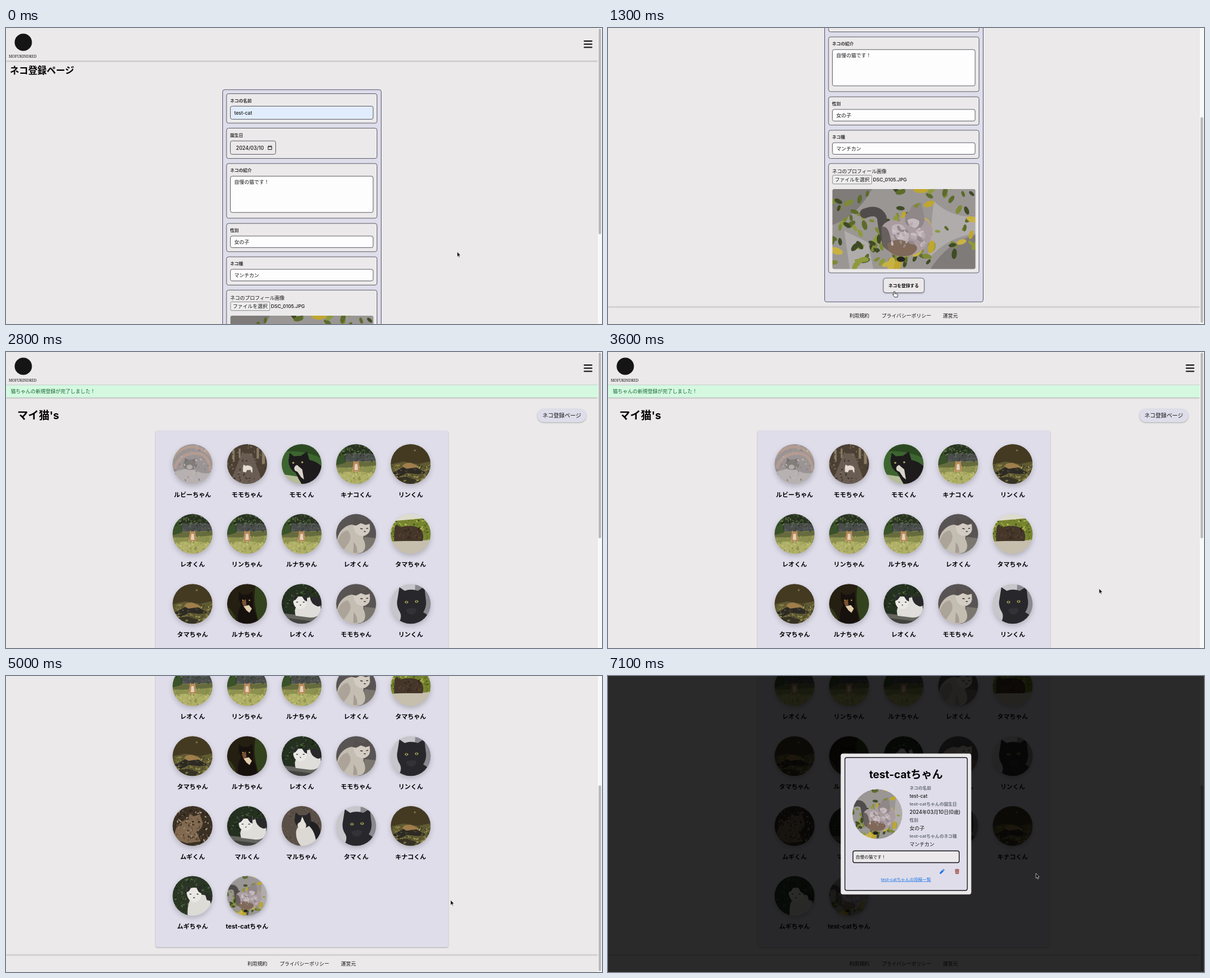
An HTML page that plays this animation: 1000 by 498 pixels, repeating every 7200 ms.

```html
<!DOCTYPE html>
<html lang="ja">
<head>
<meta charset="utf-8">
<title>ネコ登録ページ</title>
<style>
html, body { margin: 0; width: 100%; height: 100%; overflow: hidden; background: #ebe9ea; }
svg { display: block; }
#stage { width: 100vw; height: 100vh; }
text {
  font: 500 8.35px Inter, "Noto Sans CJK JP", "Noto Sans CJK", sans-serif;
  dominant-baseline: central; fill: #151515;
}
.h1 { font-size: 15.5px; font-weight: 700; fill: #000; }
.h2 { font-size: 18px; font-weight: 700; fill: #000; }
.label { font-size: 7.3px; font-weight: 700; fill: #333; }
.hint { font-size: 7.3px; font-weight: 700; fill: #6b7078; }
.name { font-size: 10.4px; font-weight: 700; text-anchor: middle; fill: #000; }
.latin { font-size: 8px; }
.mid { text-anchor: middle; }
.brand { font: 6.2px "Noto Serif", serif; }
.link { font-size: 7.2px; font-weight: 400; fill: #1f75e5; text-decoration: underline; dominant-baseline: auto; }
.card { fill: #ebe9ea; stroke: #4b4b55; stroke-width: .85; }
.field { fill: #fdfdfd; stroke: #4b4b55; stroke-width: .85; }
.raised { filter: drop-shadow(0 1px 1.2px rgba(0,0,0,.28)); }
.disc { filter: drop-shadow(0 4px 4px rgba(0,0,0,.2)); }
.photo { filter: blur(.7px); }

/* The picture holds for 100 ms at a time; the small lead keeps each step on its tick. */
.anim { animation: 7200ms step-end -4ms infinite; }
#form { animation-name: form; }
#list { animation-name: list; }
#formBody { animation-name: form-scroll; }
#formThumb { animation-name: form-thumb; }
#listBody { animation-name: list-scroll; }
#listThumb { animation-name: list-thumb; }
#modal { animation-name: modal; }
#cursor { animation-name: cursor; }
#arrow { animation-name: arrow; }
#hand { animation-name: hand; }
.hover { animation-name: hover; }

@keyframes form { 0% { opacity: 1 } 34.722%, 100% { opacity: 0 } }
@keyframes list { 0% { opacity: 0 } 34.722%, 100% { opacity: 1 } }
@keyframes form-scroll {
  0% { transform: translateY(0) }
  11.111% { transform: translateY(0); animation-timing-function: steps(4) }
  16.667%, 100% { transform: translateY(-213px) }
}
@keyframes form-thumb {
  0% { transform: translateY(0) }
  11.111% { transform: translateY(0); animation-timing-function: steps(4) }
  16.667%, 100% { transform: translateY(149px) }
}
@keyframes list-scroll {
  0% { transform: translateY(0) }
  66.667% { transform: translateY(0); animation-timing-function: steps(2) }
  69.444%, 100% { transform: translateY(-289px) }
}
@keyframes list-thumb {
  0% { transform: translateY(0) }
  66.667% { transform: translateY(0); animation-timing-function: steps(2) }
  69.444%, 100% { transform: translateY(183px) }
}
@keyframes hover {
  0% { transform: scale(1) }
  76.389% { transform: scale(1); animation-timing-function: steps(2) }
  79.167% { transform: scale(1.09) }
  84.722%, 100% { transform: scale(1) }
}
@keyframes modal {
  0% { opacity: 0 }
  83.333% { opacity: 0; animation-timing-function: steps(2) }
  86.111%, 100% { opacity: 1 }
}
@keyframes cursor {
  0% { transform: translate(757px, 376.5px); opacity: 1 }
  4.167% { transform: translate(757px, 376.5px); animation-timing-function: steps(5) }
  11.111% { transform: translate(480.5px, 443px) }
  34.722% { opacity: 0 }
  50% { transform: translate(824px, 398px); opacity: 1; animation-timing-function: steps(4) }
  55.556% { transform: translate(775px, 382.5px) }
  66.667% { transform: translate(775px, 382.5px); animation-timing-function: steps(2) }
  69.444% { transform: translate(746px, 377px) }
  72.222% { transform: translate(746px, 377px); animation-timing-function: steps(5) }
  79.167% { transform: translate(403px, 387px) }
  84.722% { transform: translate(403px, 387px); animation-timing-function: steps(3) }
  88.889%, 100% { transform: translate(718px, 332px); opacity: 1 }
}
@keyframes arrow { 0% { opacity: 1 } 16.667% { opacity: 0 } 34.722%, 100% { opacity: 1 } }
@keyframes hand { 0% { opacity: 0 } 16.667% { opacity: 1 } 34.722%, 100% { opacity: 0 } }
</style>
</head>
<body>
<svg id="stage" viewBox="0 0 1000 498" preserveAspectRatio="none">
<defs>
  <clipPath id="disc"><circle r="33.5"/></clipPath>
  <clipPath id="frame"><rect width="240" height="134.5" rx="3"/></clipPath>
  <rect id="fill" x="-40" y="-40" width="80" height="80"/>

  <g id="header">
    <rect class="raised" width="993" height="55" fill="#ebe9ea"/>
    <circle cx="29" cy="24" r="14.5" fill="#151515"/>
    <text class="brand mid" x="28" y="47">MOFUKINDRED</text>
    <path d="M970.3 22h12.6M970.3 27.2h12.6M970.3 32.4h12.6" stroke="#111" stroke-width="2" stroke-linecap="round"/>
  </g>
  <g id="footer">
    <rect y="1.3" width="993" height="28" fill="#ebe9ea" style="filter:drop-shadow(0 -1px 1px rgba(0,0,0,.25))"/>
    <text x="405" y="14.5">利用規約</text>
    <text x="459" y="14.5">プライバシーポリシー</text>
    <text x="562" y="14.5">運営元</text>
  </g>

  <g id="blanket" class="photo">
    <use href="#fill" fill="#9b9494"/>
    <path d="M-34-12Q-10-36 12-26T34-4M-30 8Q-24-16 2-18T30 12" fill="none" stroke="#b39c92" stroke-width="5"/>
    <path d="M-40 18Q-12 2 8 12T40 6V40H-40z" fill="#b7b2b1"/>
    <ellipse cx="-4" cy="1" rx="12" ry="9" fill="#827d7b"/>
    <path d="M-13-3l0-7 6 3zM4-4l2-6-7 3z" fill="#75706f"/>
    <ellipse cx="-5" cy="5" rx="5" ry="4" fill="#b3aca9"/>
    <g data-specks="#8b8585 #a99f9c #c2b7b2" data-area="-34 -34 68 68" data-count="50"/>
  </g>
  <g id="lane" class="photo">
    <use href="#fill" fill="#4b4033"/>
    <path d="M-9-18H8L30 40H-32z" fill="#695d53"/>
    <path d="M-25-24h4v20h-4zM-14-26h3v16h-3zM16-27h4v18h-4zM25-24h5v24h-5z" fill="#8b7c66"/>
    <g data-specks="#5a4c3d #3c3328 #7c6d5f" data-area="-34 -34 68 68" data-count="80"/>
    <path d="M-7 13V6l1-5 4 2 3-1 6 2 2 3v7H7L6 10H0l-2 4z" fill="#e6dcd4"/>
  </g>
  <g id="tuxedo" class="photo">
    <use href="#fill" fill="#3d6530"/>
    <path d="M-40-40H40V-6Q8-26-40-20z" fill="#2c4a22"/>
    <path d="M-40 16L0 22V40H-40z" fill="#b4bd98"/>
    <path d="M-22-6L-20-19-13-13-1-14 9-21 13-7Q30-4 40 12V40H4Q-4 28-10 15-22 8-22-6z" fill="#1d1b1c"/>
    <path d="M-12 5Q-8-1-5 4L1 9 4 26-1 22-7 13Q-14 11-12 5z" fill="#d9d4ca"/>
    <circle cx="-14" cy="-2" r="1.7" fill="#a3a45a"/><circle cx="1" cy="-3" r="1.7" fill="#a3a45a"/>
  </g>
  <g id="garden" class="photo">
    <use href="#fill" fill="#2a3423"/>
    <rect x="-18" y="-18" width="58" height="15" fill="#4a4e4b"/>
    <path d="M-40-4Q-8-3 40-6V40H-40z" fill="#8d9150"/>
    <path d="M-40 16Q0 8 40 18V40H-40z" fill="#b0b068"/>
    <path d="M-40-5Q0-1 40-6V1Q0 8-40 5z" fill="#666b3e"/>
    <path d="M-40-40H-15Q-21-16-18-2L-40 4z" fill="#3a5229"/>
    <g data-specks="#c3c27c #858b48 #a3a65a" data-area="-34 4 68 30" data-count="110"/>
    <g data-specks="#495f35 #202a1b #66784a" data-area="-34 -34 68 20" data-count="60"/>
    <g data-specks="#3d403d #5d625e" data-area="-18 -18 52 14" data-count="30"/>
    <path d="M-4-6l2 2h4l2-2 1 6 1 9-1 4H1l-1-2-1 2h-4l-1-4 1-9z" fill="#b98a5c"/>
    <path d="M-2 0h4l1 10h-6z" fill="#e3d3bb"/>
  </g>
  <g id="rocks" class="photo">
    <use href="#fill" fill="#443a22"/>
    <path d="M-40 2L-12-4 12 0 40-6V40H-40z" fill="#605a32"/>
    <g data-specks="#8f8948 #3d3a26 #a39f62" data-area="-34 0 68 34" data-count="110"/>
    <path d="M-30 15L-12 5 10 6 26 15 12 17-6 15-20 22z" fill="#2d2a24"/>
    <path d="M-40 26L-8 21 10 27 0 40H-40z" fill="#373324"/>
    <path d="M-14 4Q-12-3 0-2L10 2 14 5-7 8z" fill="#a07d4b"/>
    <g data-specks="#7d7745 #4b4630" data-area="-30 8 60 22" data-count="35"/>
    <circle cx="7" cy="-23" r="1.6" fill="#837546"/>
  </g>
  <g id="cream" class="photo">
    <use href="#fill" fill="#595454"/>
    <path d="M14 5L40 8V40H7z" fill="#7b776f"/>
    <path d="M-32 28Q-36-2-16-13-6-18 0-14 14-8 12 8 20 26 8 32-14 38-32 28z" fill="#c4bdb2"/>
    <path d="M-5-14L-2-26 5-22Q12-24 16-22L22-27 23-12Q25-2 15 3 3 5-2-4z" fill="#d3ccc3"/>
    <path d="M-6-15L-3-28 5-23 15-23 22-28 23-17 16-15 8-18 0-14z" fill="#55504e"/>
    <path d="M-31 12Q-26-4-14-6-6 4-12 14T-22 28z" fill="#aca499"/>
    <path d="M-4 14Q2 20 2 32H-5z" fill="#a59d93"/>
    <path d="M7-9l4 .6M17-9l3-.6M13-4h3" stroke="#3a3532" stroke-width="1.5"/>
  </g>
  <g id="ledge" class="photo">
    <use href="#fill" fill="#77852f"/>
    <g data-specks="#b6ba55 #5f7027 #39481c" data-area="-34 -32 68 44" data-count="130"/>
    <path d="M-40-40H40V-28L-25-22-40-24z" fill="#dedccd"/>
    <path d="M-40 13L40 10V40H-40z" fill="#c6bfae"/>
    <path d="M-28 12L-27-12-23-16-18-11-9-13Q10-16 18-6 23 2 20 12z" fill="#45362a"/>
    <g data-specks="#5b4733 #33271b" data-area="-22 -9 38 18" data-count="25"/>
  </g>
  <g id="shade" class="photo">
    <use href="#fill" fill="#251f12"/>
    <path d="M16-40H40V40H24Q6 0 16-40z" fill="#33431e"/>
    <path d="M-40 2Q-20 8-16 40H-40z" fill="#343a1b"/>
    <path d="M-15 40Q-18 12-10 2L-14-8-14-20-7-15 3-16 9-21 10-8Q10-1 10 6 18 18 16 40z" fill="#17110e"/>
    <path d="M-9-3L-2-8-1 2-6 4z" fill="#7b5133"/>
    <path d="M-6 4L3 2 8 8 4 15-1 11z" fill="#e3cfae"/>
    <circle cx="-7" cy="-6" r="1.3" fill="#b59a4d"/><circle cx="4" cy="-6" r="1.3" fill="#b59a4d"/>
  </g>
  <g id="stone" class="photo">
    <use href="#fill" fill="#243020"/>
    <g data-specks="#384b2d #17200f #49603b" data-area="-34 -34 68 46" data-count="90"/>
    <path d="M-40 15L40 24V40H-40z" fill="#64645f"/>
    <path d="M-40 22L40 32V40H-40z" fill="#42433f"/>
    <path d="M-10 20Q-13 10-9 5 4-13 21-11 33-6 32 10 30 24 14 23z" fill="#dfdeda"/>
    <path d="M-14-3L-12-16-6-12Q-2-13 2-12L9-17 9-2Q8 8-3 9-13 7-14-3z" fill="#eae8e5"/>
    <path d="M-14-5L-12-17-6-12-10-7zM1-12L9-18 9-4 5-6zM14-12Q28-16 33-4 34 6 26 4 15 0 14-12z" fill="#29282b"/>
    <path d="M-9-3h3M2-3h3M-3 2h2" stroke="#4b4b40" stroke-width="1.5"/>
  </g>
  <g id="black" class="photo">
    <use href="#fill" fill="#c6c6cb"/>
    <path d="M8-40H40V40H4z" fill="#89898f"/>
    <path d="M-28 40Q-12 26-18 14-25 4-22-9L-19-28-10-22Q0-26 12-22L23-29 25-10Q28 4 21 14 36 22 40 40z" fill="#28282c"/>
    <path d="M-8 10Q1 4 10 9 8 18 1 18-6 17-8 10z" fill="#333337"/>
    <ellipse cx="-7" cy="-3" rx="2.8" ry="2" fill="#a8a25e"/><ellipse cx="10" cy="-4" rx="2.8" ry="2" fill="#a8a25e"/>
    <circle cx="-7" cy="-3" r="1"/><circle cx="10" cy="-4" r="1"/>
  </g>
  <g id="tabby" class="photo">
    <use href="#fill" fill="#3b3024"/>
    <g data-specks="#b8a58c #5f4d38 #241c15" data-area="-34 -34 68 68" data-count="120"/>
    <path d="M-31 22Q-30-8-7-11L-5-21 2-16 12-20 17-6Q17 6 6 10L14 26-10 29z" fill="#80694f"/>
    <g data-specks="#403226 #a28c70 #5e4a37" data-area="-27 -12 40 36" data-count="60"/>
    <path d="M-1-7h3M9-7h3" stroke="#1f1813" stroke-width="2"/>
  </g>
  <g id="proud" class="photo">
    <use href="#fill" fill="#5b5047"/>
    <g data-specks="#6b6056 #4a4038" data-area="-34 -34 68 68" data-count="60"/>
    <path d="M11-8Q30-8 32 13L25 32 10 22z" fill="#201f21"/>
    <path d="M-9 8Q-6-4 10-2 24 8 25 34H-1Q-11 22-9 8z" fill="#dcd8d3"/>
    <path d="M-12-10L-10-23-4-18 7-18 14-23 16-8Q14 3 2 4-10 3-12-10z" fill="#262527"/>
    <path d="M1-16L5-7Q10-1 6 4-1 7-6 2-9-4-2-7z" fill="#e4dfd9"/>
  </g>
  <g id="hedge" class="photo">
    <use href="#fill" fill="#2a3724"/>
    <g data-specks="#405235 #1b2617 #566b47" data-area="-34 -34 68 68" data-count="110"/>
    <path d="M-8 36Q-10 14-3 6 12-6 24 0 34 10 30 30L22 40z" fill="#dcdbd6"/>
    <path d="M-10-5L-9-17-3-13Q3-15 8-13L15-18 15-3Q14 9 3 11-8 9-10-5z" fill="#e9e8e4"/>
    <path d="M-10-6L-9-18-3-13-6-8zM7-13L15-19 15-4 10-7zM20-6Q32-4 33 9L24 7z" fill="#2b2b2c"/>
    <path d="M-5-3h3M7-3h3M1 3h3" stroke="#4b4b3a" stroke-width="1.5"/>
  </g>
  <g id="nap" class="photo">
    <rect x="-6" y="-6" width="252" height="147" fill="#9a9694"/>
    <path d="M-6-6H70Q40 50-6 62zM160 141Q195 84 246 76V141z" fill="#7f7b78"/>
    <path d="M170 20Q200 50 246 46V74Q190 80 160 120zM20 70L60 90 70 141H30z" fill="#b0acac"/>
    <g data-specks="#7f8a36 #8f9a3c #3f4b26 #5c6b2a" data-area="-4 -4 248 142" data-count="105" data-size="9"/>
    <g data-specks="#bfa62f #c9b244" data-area="0 0 240 134" data-count="16" data-size="13"/>
    <path d="M54 41Q76 32 83 48 84 64 92 92" fill="none" stroke="#504c4b" stroke-width="16" stroke-linecap="round"/>
    <path d="M84 62Q94 48 112 54 122 42 136 44 162 46 168 68 168 92 146 106 120 120 96 108 82 88 84 62z" fill="#a99ca0"/>
    <path d="M82 64Q92 60 96 76 98 94 112 106 92 108 84 94z" fill="#68605f"/>
    <path d="M92 92Q112 78 136 92 150 100 132 111 108 118 94 104z" fill="#806959"/>
    <path d="M100 62Q114 54 122 66 134 76 124 88 108 84 100 74z" fill="#c2b5ba"/>
    <path d="M122 44L130 36 134 26 141 33 149 22 153 42Q158 58 146 66 130 68 122 56z" fill="#8f8788"/>
    <path d="M126 52Q136 46 146 54 146 64 138 66 128 64 126 52z" fill="#c5babd"/>
    <g data-specks="#b8abb0 #95898b #cabec3" data-area="98 58 56 38" data-count="32" data-size="6"/>
    <ellipse cx="115" cy="118" rx="7" ry="4.5" fill="#26241f"/>
  </g>
</defs>

<rect width="1000" height="498" fill="#ebe9ea"/>

<g id="form" class="anim">
  <g id="formBody" class="anim">
    <use href="#header"/>
    <text class="h1" x="6.5" y="71">ネコ登録ページ</text>
    <rect x="363.5" y="103.8" width="266" height="570" rx="3.5" fill="#deddea" stroke="#3f4260" stroke-width=".85"/>
    <g class="card">
      <rect x="370" y="110.5" width="252.5" height="49.5" rx="3.5"/>
      <rect x="370" y="168.5" width="252.5" height="51" rx="3.5"/>
      <rect x="370" y="228" width="252.5" height="92" rx="3.5"/>
      <rect x="370" y="328.8" width="252.5" height="47.5" rx="3.5"/>
      <rect x="370" y="385" width="252.5" height="47.5" rx="3.5"/>
      <rect x="370" y="441" width="252.5" height="184" rx="3.5"/>
    </g>
    <g class="field">
      <rect x="376.5" y="131.5" width="239.5" height="22" rx="3" style="fill:#e1ecfc"/>
      <rect x="376.5" y="190" width="76" height="22.5" rx="3" style="fill:#ebe9ea"/>
      <rect x="376.5" y="249.3" width="239.5" height="61" rx="3"/>
      <rect x="376.5" y="350" width="239.5" height="19.5" rx="3"/>
      <rect x="376.5" y="406" width="239.5" height="19.5" rx="3"/>
    </g>
    <text class="label" x="376" y="122">ネコの名前</text>
    <text class="latin" x="383" y="142.5">test-cat</text>
    <text class="label" x="376" y="180.5">誕生日</text>
    <text x="386" y="201.5">2024/03/10</text>
    <path d="M439.8 199.2h6v5.3h-6zM439.8 199.8h6M441 197.6v1.5M444.6 197.6v1.5" fill="none" stroke="#222"/>
    <text class="label" x="376" y="239.5">ネコの紹介</text>
    <text x="383" y="259">自慢の猫です！</text>
    <text class="label" x="376" y="340.5">性別</text>
    <text x="383" y="360">女の子</text>
    <text class="label" x="376" y="396.5">ネコ種</text>
    <text x="383" y="416">マンチカン</text>
    <text x="376" y="454">ネコのプロフィール画像</text>
    <rect x="376.8" y="460.8" width="65.7" height="14.5" rx="1.5" fill="#efefef" stroke="#767676" stroke-width=".8"/>
    <text x="380.5" y="468">ファイルを選択</text>
    <text x="444.5" y="468" style="font-size:8.1px">DSC_0105.JPG</text>
    <g transform="translate(376.5 484)" clip-path="url(#frame)"><use href="#nap"/></g>
    <rect class="raised" x="462" y="633.8" width="68.5" height="24.5" rx="4" fill="#ebe9ea" stroke="#55565f" stroke-width=".8"/>
    <text class="label mid" x="496" y="646" style="fill:#111">ネコを登録する</text>
    <use href="#footer" y="682"/>
  </g>
  <rect x="993" width="7" height="498" fill="#f8f8f8"/>
  <rect id="formThumb" class="anim" x="994.2" y="1" width="4.3" height="346" rx="2.1" fill="#b9b9b9"/>
</g>

<g id="list" class="anim">
  <rect width="1000" height="498" fill="#ebe9ea"/>
  <g id="listBody" class="anim">
    <use href="#header"/>
    <rect class="raised" y="55.5" width="993" height="21" fill="#d4f9e0"/>
    <text x="8" y="66.3" style="fill:#17652f">猫ちゃんの新規登録が完了しました！</text>
    <text class="h2" x="19" y="106.5">マイ猫's</text>
    <rect class="raised" x="891.5" y="95.5" width="82" height="22.5" rx="11.2" fill="#deddea"/>
    <text class="mid" x="932.5" y="106.3" style="font-size:9.35px">ネコ登録ページ</text>
    <rect class="raised" x="251" y="132.5" width="491" height="612.5" rx="3" fill="#dfddea"/>
    <g id="cats"></g>
    <use href="#footer" y="758"/>
  </g>
  <rect x="993" width="7" height="498" fill="#f8f8f8"/>
  <rect id="listThumb" class="anim" x="994.2" y="1" width="4.3" height="312.5" rx="2.1" fill="#b9b9b9"/>
</g>

<g id="modal" class="anim">
  <rect width="1000" height="498" opacity=".82"/>
  <rect x="390.5" y="130.5" width="219" height="237" rx="4" fill="#ebe9ea"/>
  <rect x="397.5" y="137.3" width="205.3" height="223.5" rx="3" fill="#dfddea" stroke="#202024" stroke-width="1.4"/>
  <text class="h2 mid" x="500" y="165">test-catちゃん</text>
  <g transform="translate(452 232.3) scale(1.25)"><g clip-path="url(#disc)">
    <use href="#nap" transform="scale(.5) translate(-120 -67)"/>
  </g></g>
  <text class="hint" x="506" y="188.5">ネコの名前</text>
  <text class="latin" x="506" y="202">test-cat</text>
  <text class="hint" x="506" y="215.5">test-catちゃんの誕生日</text>
  <text x="506" y="229.3">2024年03月10日(0歳)</text>
  <text class="hint" x="506" y="242.5">性別</text>
  <text x="506" y="256.3">女の子</text>
  <text class="hint" x="506" y="269.5">test-catちゃんのネコ種</text>
  <text x="506" y="283.3">マンチカン</text>
  <rect x="411" y="294.3" width="178.3" height="19.7" rx="3" fill="#ebe9ea" stroke="#202024" stroke-width="1.4"/>
  <text x="415.5" y="304" style="font-size:7.25px">自慢の猫です！</text>
  <path d="M556.4 333l.6-2.8 4.2-4.2 2.2 2.2-4.2 4.2zM561.8 325.4l1-.9 2.2 2.2-1 .9z" fill="#1f75e5"/>
  <path d="M582 325.2h2.2l.5-.8h2l.5.8h2.2v1.2H582zM582.5 327h6.4l-.5 6h-5.4z" fill="#a34e45"/>
  <path d="M584.4 328v4M585.7 328v4M587 328v4" stroke="#dfddea" stroke-width=".5"/>
  <text class="link mid" x="500" y="344.6">test-catちゃんの投稿一覧</text>
</g>

<g id="cursor" class="anim">
  <path id="arrow" class="anim" d="M0 0V8.4L1.9 6.7 3.1 9.5 4.4 8.9 3.2 6.2 5.7 6z" fill="#0a0a0a" stroke="#fff" stroke-width=".6"/>
  <path id="hand" class="anim" d="M-1 1.2q0-1.2 1-1.2t1 1.2v2.6l3.6.8q1.2.3 1.2 1.6L5 9.8H.4L-2.6 6q-.2-1.4 1.6-.4z" fill="#fff" stroke="#111" stroke-width=".8"/>
</g>
</svg>

<script>
const cats = [
  "blanket ルビーちゃん", "lane モモちゃん", "tuxedo モモくん", "garden キナコくん", "rocks リンくん",
  "garden レオくん", "garden リンちゃん", "garden ルナちゃん", "cream レオくん", "ledge タマちゃん",
  "rocks タマちゃん", "shade ルナちゃん", "stone レオくん", "cream モモちゃん", "black リンくん",
  "tabby ムギくん", "stone マルくん", "proud マルちゃん", "black タマくん", "rocks キナコくん",
  "hedge ムギちゃん", "nap test-catちゃん"
];

function seeded(seed) {
  return () => (seed = seed * 16807 % 2147483647) / 2147483647;
}

// Leaves, grass, gravel and fur: tilted ovals spread over an area.
document.querySelectorAll("[data-specks]").forEach((group, i) => {
  const rnd = seeded(4001 + i * 977);
  const { specks, area, count, size = 2.4 } = group.dataset;
  const colors = specks.split(" ");
  const [x, y, w, h] = area.split(" ").map(Number);
  group.innerHTML = Array.from({ length: count }, (_, n) => {
    const r = size * (0.5 + rnd() * 0.5);
    const place = `translate(${x + rnd() * w} ${y + rnd() * h}) rotate(${rnd() * 180})`;
    return `<ellipse rx="${r}" ry="${r * 0.5}" fill="${colors[n % colors.length]}" transform="${place}"/>`;
  }).join("");
});

document.getElementById("cats").innerHTML = cats.map((cat, i) => {
  const [photo, name] = cat.split(" ");
  const x = 313 + i % 5 * 91.5;
  const y = 188.5 + Math.floor(i / 5) * 117.6;
  const mine = photo === "nap";
  const fit = mine ? 'transform="scale(.5) translate(-120 -67)"' : "";
  return `<g transform="translate(${x} ${y})">
    <g class="${mine ? "anim hover" : ""}"><g class="disc"><g clip-path="url(#disc)"><use href="#${photo}" ${fit}/></g></g></g>
    <text class="name" y="51.8">${name}</text></g>`;
}).join("");
</script>
</body>
</html>
```
